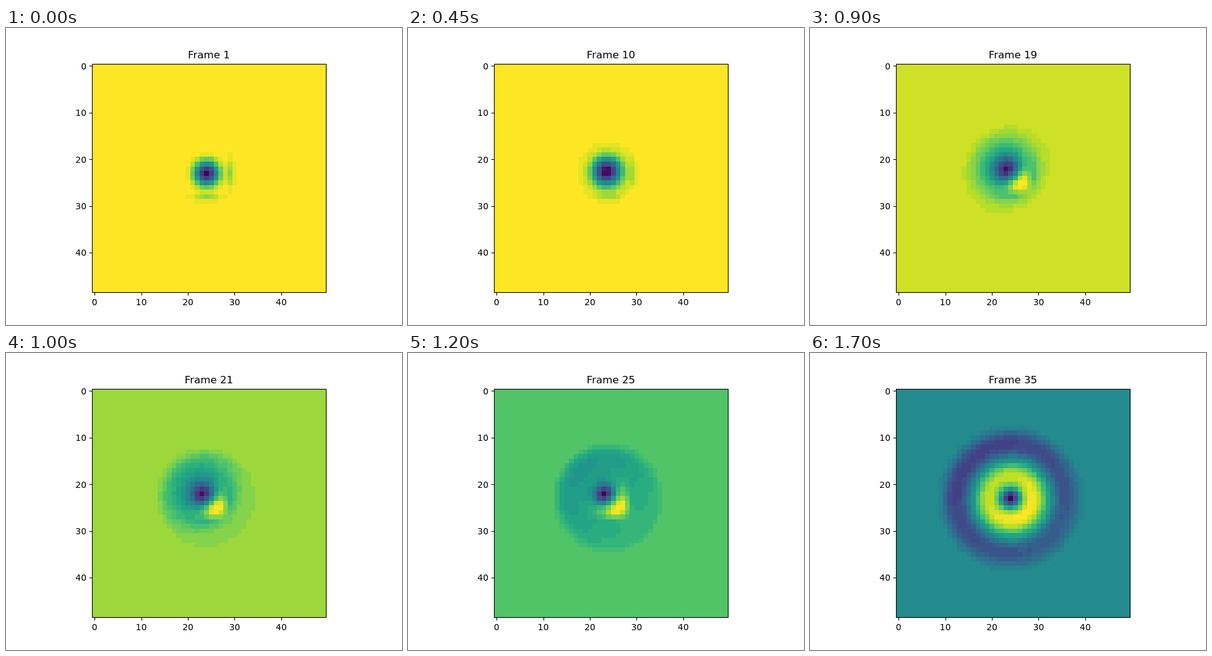
An HTML page with a canvas that plays this animation: 640 px wide and 480 px high, repeating every 1.75 s.

```html
<!DOCTYPE html>
<html lang="en">
<head>
<meta charset="utf-8">
<title>Heat map</title>
<style>
html, body { margin: 0; width: 100%; height: 100%; overflow: hidden; background: #fff; }
canvas { display: block; }
</style>
</head>
<body>
<canvas id="stage" width="640" height="480"></canvas>
<script>
const ctx = document.getElementById('stage').getContext('2d');
const COLS = 50, ROWS = 49, STEP = 50, COUNT = 35;
const CELL = 369.6 / ROWS, LEFT = 139.43, TOP = 57.6;
const CX = 24, CY = 23, LEVELS = 28;

const VIRIDIS = ['440154', '482475', '414487', '355f8d', '2a788e', '21918c',
  '22a884', '44bf70', '7ad151', 'bddf26', 'fde725']
  .map(h => [0, 2, 4].map(i => parseInt(h.slice(i, i + 2), 16)));

// Poses of the field. radial: value by distance from the centre, shift: how far
// the core sits up-left, tilt: shading toward lower right, wing: side bumps,
// blob: [height, length, width] of the crescent.
const POSES = [
  { at: 0, bg: 1, shift: 0, tilt: 0, edge: 5, wing: .17, blob: [0, 2, 1],
    radial: [0, .17, .46, .76, .97] },
  { at: 9, bg: 1, shift: .5, tilt: 0, edge: 7, wing: .09, blob: [0, 2, 1],
    radial: [-.08, .1, .33, .58, .82, .93, .97] },
  { at: 16, bg: .985, shift: 1, tilt: .02, edge: 8, wing: .09, blob: [.33, 1.9, 1.15],
    radial: [0, .15, .33, .5, .65, .77, .86, .92, .965] },
  { at: 20, bg: .85, shift: 1, tilt: .07, edge: 10, wing: .07, blob: [.43, 1.9, 1.25],
    radial: [0, .15, .32, .46, .55, .62, .65, .69, .74, .78, .81] },
  { at: 24, bg: .726, shift: 1, tilt: .06, edge: 11, wing: .04, blob: [.4, 2.1, 1.35],
    radial: [0, .18, .4, .55, .59, .6, .59, .58, .58, .59, .61, .66] },
  { at: 29, bg: .57, shift: 1, tilt: .05, edge: 13, wing: 0, blob: [.36, 2.4, 1.5],
    radial: [0, .2, .42, .58, .64, .66, .62, .55, .5, .45, .43, .43, .45, .535, .54, .54, .54] },
  { at: 34, bg: .475, shift: 0, tilt: .05, edge: 14.5, wing: 0, blob: [.02, 2.4, 1.5],
    radial: [0, .2, .53, .8, .94, .95, .87, .72, .56, .43, .32, .24, .23, .27, .35, .43] }
];

const clamp = v => Math.max(0, Math.min(1, v));
const bell = (d, s) => Math.exp(-d * d / (2 * s * s));

function fieldAt(p, x, y) {
  const dx = x - CX, dy = y - CY;
  const s = p.shift * Math.max(0, 1 - Math.hypot(dx, dy) / 14);
  const r = Math.hypot(dx + s, dy + s), i = Math.floor(r);
  const sample = k => k < p.radial.length ? p.radial[k] : p.bg;
  let v = sample(i) + (sample(i + 1) - sample(i)) * (r - i);

  const facing = (dx + dy + 2 * s) / (Math.SQRT2 * (r || 1));
  v += p.tilt * facing * Math.min(1, r / 4) * clamp((p.edge - r) / 1.5);
  v -= p.wing * (bell(x - 29, .55) * bell(dy, 1.9) + bell(y - 28, .55) * bell(dx, 1.9));

  const [height, length, width] = p.blob;
  const along = (x - 26 - (y - 25)) / Math.SQRT2;
  const across = (x - 26 + y - 25) / Math.SQRT2 + .15 * along * along;
  return v + height * bell(along, length) * bell(across, width);
}

for (const p of POSES) {
  p.field = Array.from({ length: COLS * ROWS },
    (_, n) => fieldAt(p, n % COLS, Math.floor(n / COLS)));
}

// Smooth blend through the poses at a given step.
function blender(step) {
  let k = 0;
  while (k < POSES.length - 2 && step >= POSES[k + 1].at) k++;
  const a = POSES[k], b = POSES[k + 1];
  const before = POSES[k - 1] || a, after = POSES[k + 2] || b;
  const span = b.at - a.at, u = (step - a.at) / span;
  const m0 = span / (b.at - before.at), m1 = span / (after.at - a.at);
  const h0 = u * (1 - u) * (1 - u), h1 = -u * u * (1 - u);
  const e = u * u * (3 - 2 * u);
  return get => {
    const va = get(a), vb = get(b);
    return va + (vb - va) * e + h0 * m0 * (vb - get(before)) + h1 * m1 * (get(after) - va);
  };
}

function color(v) {
  const t = clamp(v) * 10, i = Math.min(9, Math.floor(t));
  const mix = VIRIDIS[i].map((c, n) => Math.round(c + (VIRIDIS[i + 1][n] - c) * (t - i)));
  return `rgb(${mix})`;
}

function line(x1, y1, x2, y2) {
  ctx.beginPath();
  ctx.moveTo(x1, y1);
  ctx.lineTo(x2, y2);
  ctx.stroke();
}

function drawAxes() {
  ctx.strokeStyle = ctx.fillStyle = '#000';
  ctx.lineWidth = 1.11;
  ctx.strokeRect(139.5, 58.5, 378, 369);
  ctx.font = '13.89px "DejaVu Sans", sans-serif';
  for (let n = 0; n < 50; n += 10) {
    const x = LEFT + (n + .5) * CELL, y = TOP + (n + .5) * CELL;
    const sx = Math.round(x) + .5, sy = Math.round(y) + .5;
    line(sx, 427.5, sx, 432.4);
    line(134.6, sy, 139.5, sy);
    ctx.textAlign = 'center';
    ctx.fillText(n, x, 448);
    ctx.textAlign = 'right';
    ctx.fillText(n, 130, Math.round(y + 5.3));
  }
}

function draw(step) {
  ctx.fillStyle = '#fff';
  ctx.fillRect(0, 0, 640, 480);
  const blend = blender(step);
  const bg = clamp(blend(p => p.bg));
  ctx.fillStyle = color(bg);
  ctx.fillRect(139, 58, 378, 369);
  for (let n = 0; n < COLS * ROWS; n++) {
    const level = Math.round((blend(p => p.field[n]) - bg) * LEVELS);
    if (!level) continue;
    const c = n % COLS, r = Math.floor(n / COLS);
    const x = Math.round(LEFT + c * CELL), y = Math.round(TOP + r * CELL);
    ctx.fillStyle = color(bg + level / LEVELS);
    ctx.fillRect(x, y, Math.round(LEFT + (c + 1) * CELL) - x, Math.round(TOP + (r + 1) * CELL) - y);
  }
  drawAxes();
  ctx.font = '16.67px "DejaVu Sans", sans-serif';
  ctx.textAlign = 'center';
  ctx.fillText('Frame ' + (step + 1), 328, 49);
}

const start = performance.now();
let shown = -1;
function tick() {
  const step = Math.floor((performance.now() - start) / STEP) % COUNT;
  if (step !== shown) draw(shown = step);
  requestAnimationFrame(tick);
}
tick();
</script>
</body>
</html>
```
